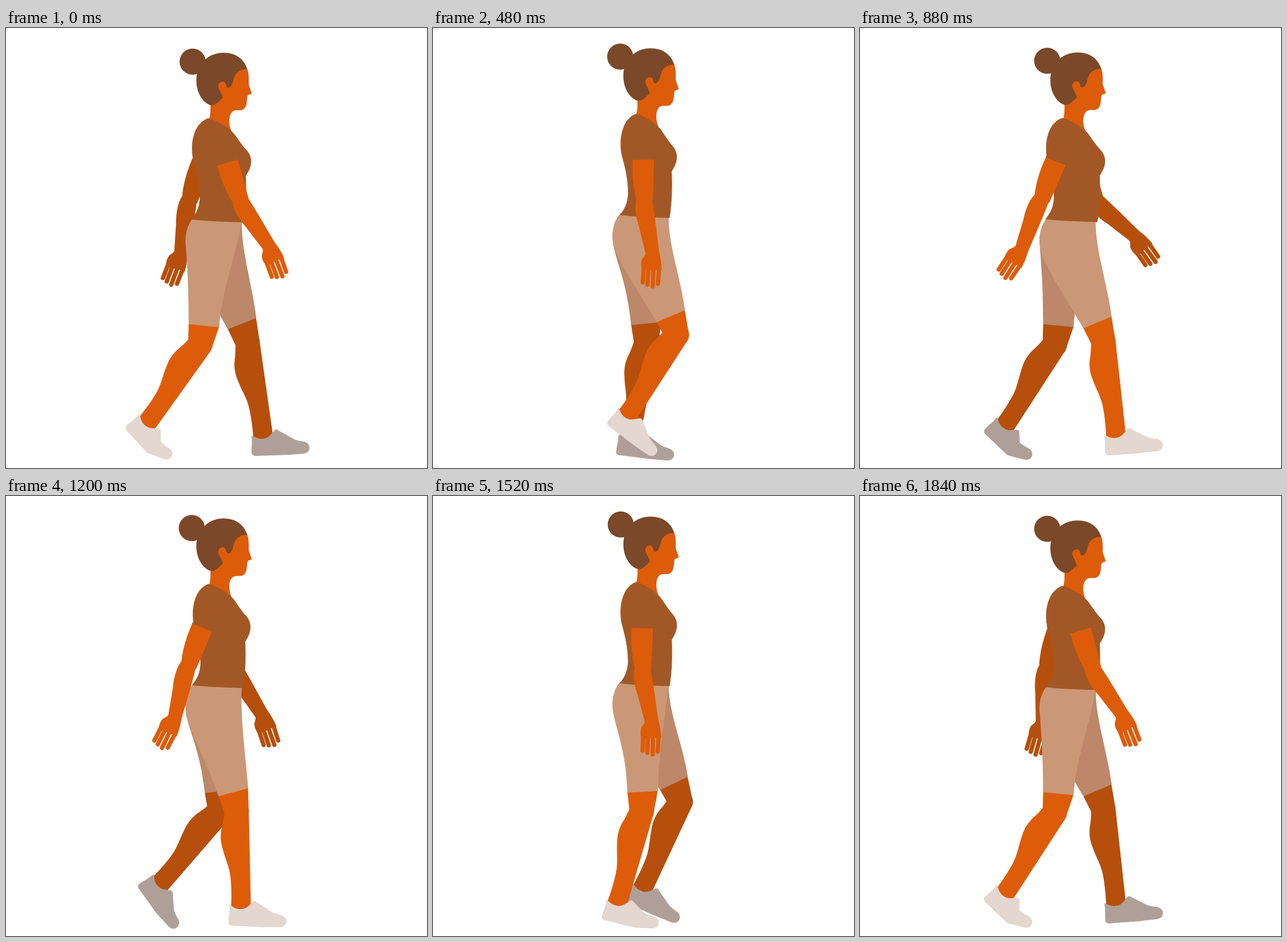
An HTML page with a canvas for the animation above (1.92 s loop, 732x765 px).

```html
<!DOCTYPE html>
<html lang="en">
<head>
<meta charset="utf-8">
<title>Walking woman</title>
<style>
  html, body { margin: 0; width: 100%; height: 100%; overflow: hidden; background: #fff; }
  canvas { display: block; width: 732px; height: 765px; }
</style>
</head>
<body>
<canvas id="stage" width="732" height="765"></canvas>
<script>
const STEP = 80, STEPS = 24, HALF = 12;
const RAD = Math.PI / 180;
const ctx = document.getElementById('stage').getContext('2d');

const NEAR = { skin: '#dd5c0a', shorts: '#ca9877', shoe: '#e3d7cf' };
const FAR = { skin: '#b64f0c', shorts: '#bc8869', shoe: '#aea098' };
const SHIRT = '#a25826', HAIR = '#7b4929';
const THIGH_LENGTH = 174, SHANK_LENGTH = 163, UPPER_LENGTH = 136;

// Mean plus one [cosine, sine] pair for each harmonic of the stride
const wave = (mean, ...pairs) => t => pairs.reduce((sum, [c, s], i) => {
  const a = (i + 1) * t / STEPS * 2 * Math.PI;
  return sum + c * Math.cos(a) + s * Math.sin(a);
}, mean);

// Angles from the vertical in degrees, positive swings back
const LEG = {
  drop: wave(0.8, [-2.4, -1.4]),
  thigh: wave(-9.6, [13.4, -7.6], [3.1, 0.6], [0.4, 1.4]),
  shank: wave(16.7, [21.8, 9.4], [-4.2, 1.9], [0, -1.4]),
  foot: wave(21.3, [26.7, 11.3], [0.4, 6.1], [-2.1, -3.6]),
  push: wave(-13, [38, -12.4])
};
const NEAR_ARM = {
  upper: wave(3.2, [-20.6, -3.6], [0, 0.8]),
  fore: wave(-6, [-27, -1.5], [0, 1], [0, 2])
};
const FAR_ARM = {
  upper: wave(1, [19.5, 3], [0, 2]),
  fore: wave(-17, [25, 5], [-4, 4], [4, 0])
};

const shape = d => new Path2D(d);
const THIGH = shape('M-24.7 139L28.5 138L21 174L-21.5 173Z');
const SHANK = shape('M-21 -4C-23 8 -24 14 -26 22C-31 36 -31 50 -28 62C-24 82 -17 95 -16 115C-15 135 -16 150 -17.5 170L17 170L20.5 8L20 -4Z');
const UPPER = shape('M-17.5 64L-18.5 67C-19.5 92 -18 112 -12.500 134L0 146L16.500 138C17 115 18.500 95 18.500 67L17.500 64Z');
const FORE = shape('M-12 -3C-18 10 -18 30 -15.500 45L-12 93C-14 99 -19 99 -21 105C-24 111 -22.500 117 -23 121L-8 123L2 124L11 126L12 117C13 108 12 100 12 92C13 65 15 35 15 2L0 -12Z');
const SLEEVE = shape('M-12 14L-18.500 67L18.500 67L14 14Z');
const FINGERS = shape('M-19.400 118L-25 142M-11.300 119L-17.600 147M-2.300 120L-9 151.500M7.800 119L.6 148.500');
const TORSO = shape('M352 157C362 159 382 168 396 183C402 191 409 202 417 211C430 224 429 240 417 257C418 280 418 310 413 338C385 337 350 336 322 333C331 322 336 312 337 296C337 270 331 248 325 228C321 205 324 185 334 170C340 163 346 158 352 157Z');
const FACE = shape('M408 66L419.500 71C422 78 422.500 88 422 98L427 113C427.500 116 422 115 420.500 117C418.500 122 419.500 126 418.500 130C417 138 414 143 407 143C402 143.500 397 142 393 146C388 152 388 160 388.500 166C389 172 391 178 394 184L352 162C356 152 355.500 145 355.500 130L368 90Z');
const HAIRCAP = shape('M347 54.500C355 47 366 43 378 43C400 43 414 54 419.500 71.500C408 71 400 77 397 85C395 92 393 103 387 104C382 104 383.500 98 381 95C377 91 370 94 369 100C369 107 375 112 377 121C372 126 365 134 358 134.500C345 133 331 115 331 92C331 84 332 80 333 76Z');

function turn(x, y, deg) {
  const c = Math.cos(deg * RAD), s = Math.sin(deg * RAD);
  return [x * c - y * s, x * s + y * c];
}

function shifted(x, y, dx, dy, deg) {
  const [px, py] = turn(dx, dy, deg);
  return [x + px, y + py];
}

function at(x, y, deg, draw) {
  ctx.save();
  ctx.translate(x, y);
  ctx.rotate(deg * RAD);
  draw();
  ctx.restore();
}

function fill(path, color) {
  ctx.fillStyle = color;
  ctx.fill(path);
}

function disc(x, y, r, color) {
  ctx.fillStyle = color;
  ctx.beginPath();
  ctx.arc(x, y, r, 0, 7);
  ctx.fill();
}

// The toe half turns about the ball of the foot
function shoe(bend) {
  const toe = (x, y) => ` ${shifted(38, 37, x - 38, y - 37, bend)} `;
  return shape('M-18 1C-14 3 -9 7 -1 7C9 7 14 0 20 -6Q22.500 -9.500 26 -7L' + toe(53, 10) +
    'C' + toe(60, 14) + toe(66, 14) + toe(72, 16) +
    'C' + toe(79, 18.5) + toe(81, 25) + toe(79, 30) +
    'C' + toe(77, 35) + toe(73, 36) + toe(68, 36.5) +
    'L' + toe(41, 37) + 'L38 37L-14 36C-20 36 -22 32 -21 27C-21 20 -19 12 -20 3Q-20 0 -18 1Z');
}

function leg(t, bob, tone) {
  const thigh = LEG.thigh(t), shank = LEG.shank(t), foot = LEG.foot(t);
  const x = 360, y = 380 + bob + LEG.drop(t);

  at(x, y, thigh, () => {
    fill(THIGH, tone.skin);
    at(0, THIGH_LENGTH, shank - thigh, () => {
      disc(0, 0, 21, tone.skin);
      fill(SHANK, tone.skin);
      at(0, SHANK_LENGTH, foot - shank, () => {
        fill(shoe(-Math.max(0, LEG.push(t))), tone.shoe);
      });
    });
  });

  // The shorts stretch from the fixed waist to the swinging hem
  const hemL = shifted(x, y, -24.7, 140.7, thigh);
  const hemR = shifted(x, y, 28.7, 139.3, thigh);
  const back = shifted(...hemL, 0, -80, Math.min(0, thigh * 1.4));
  const front = shifted(...hemR, 0, -60, thigh * 0.35);
  fill(shape(`M326 ${330 + bob}C315 ${342 + bob} 311 ${360 + bob} 312.5 ${376 + bob}` +
    `C314 ${405 + bob} ${back} ${hemL}L${hemR}` +
    `C${front} 406 ${375 + bob} 410.5 ${330 + bob}Z`), tone.shorts);
}

function arm(swing, t, bob, tone) {
  const upper = swing.upper(t), fore = swing.fore(t);
  at(365, 170 + bob, upper, () => {
    fill(UPPER, tone.skin);
    at(0, UPPER_LENGTH, fore - upper, () => {
      fill(FORE, tone.skin);
      ctx.strokeStyle = tone.skin;
      ctx.lineWidth = 7.5;
      ctx.lineCap = 'round';
      ctx.stroke(FINGERS);
    });
    if (tone === NEAR) fill(SLEEVE, SHIRT);
  });
}

function draw(step) {
  const lift = (1 - Math.cos(step / HALF * 2 * Math.PI)) / 2;
  const bob = -7.8 * lift;
  const sway = Math.cos((step - 8.5) / HALF * 2 * Math.PI);

  ctx.fillStyle = '#fff';
  ctx.fillRect(0, 0, 732, 765);
  arm(FAR_ARM, step, bob, FAR);
  leg(step + HALF, bob, FAR);
  leg(step, bob, NEAR);

  at(0, bob, 0, () => {
    fill(FACE, NEAR.skin);
    fill(HAIRCAP, HAIR);
    disc(325 + 2 * sway, 58 - 1.7 * sway, 22.7, HAIR);
    ctx.translate(380, 0);
    ctx.scale(1 - 0.05 * lift, 1);
    ctx.translate(-380, 0);
    fill(TORSO, SHIRT);
  });
  arm(NEAR_ARM, step, bob, NEAR);
}

let shown = -1;
function tick() {
  const step = Math.floor(performance.now() / STEP) % STEPS;
  if (step !== shown) draw(shown = step);
  requestAnimationFrame(tick);
}
tick();
</script>
</body>
</html>
```
